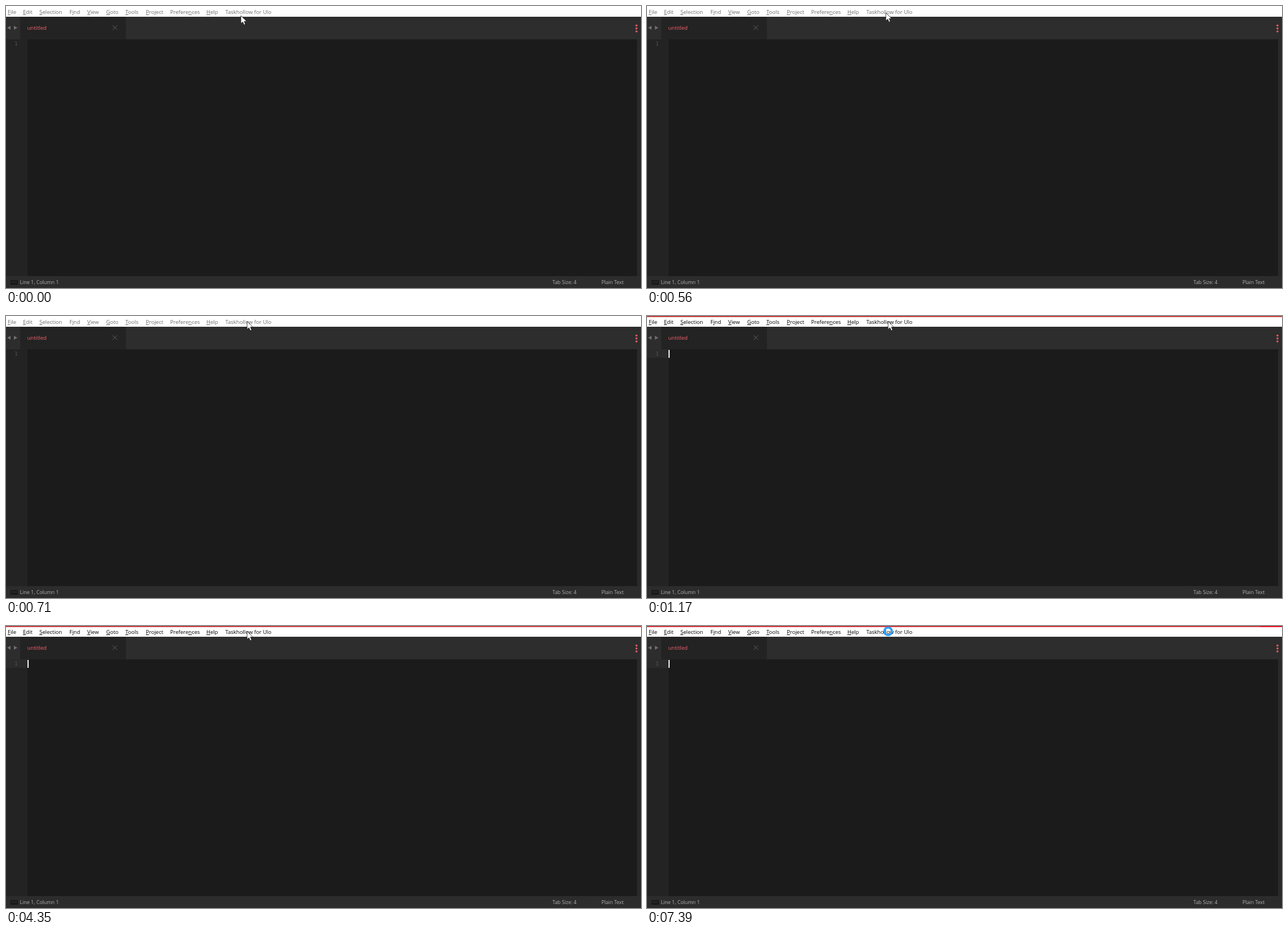
An HTML page with a canvas that plays this animation: 1122 by 499 pixels, repeating every 8000 ms.

```html
<!DOCTYPE html>
<html lang="en">
<head>
<meta charset="utf-8">
<title>Text editor</title>
<style>
  html, body { margin: 0; width: 100%; height: 100%; overflow: hidden; background: #1b1b1b; }
  canvas { display: block; }
</style>
</head>
<body>
<canvas id="stage" width="1122" height="499"></canvas>
<script>
const ctx = document.getElementById('stage').getContext('2d');
const W = 1122, H = 499, LOOP = 8000;
const UI = '"Open Sans", "Noto Sans", sans-serif';
const MONO = '"DejaVu Sans Mono", monospace';

// label, left edge, index of the underlined letter
const MENU = [
  ['File', 3, 0], ['Edit', 30, 0], ['Selection', 59, 0], ['Find', 112, 1],
  ['View', 143.5, 0], ['Goto', 177, 0], ['Tools', 211, 0], ['Project', 247, 0],
  ['Preferences', 290, 7], ['Help', 354, 0], ['Taskhollow for Ulo', 387.5, -1]
];

// start time and tip of the pointer
const POINTER = [[0, 415, 17], [560, 422, 12], [710, 426, 9.5]];
const FOCUS = 1020, UNHOVER = 1170, BUSY = 6470;

function rect(x, y, w, h, color) {
  ctx.fillStyle = color;
  ctx.fillRect(x, y, w, h);
}

function text(str, x, y, size, color, family = UI) {
  ctx.font = `${size}px ${family}`;
  ctx.fillStyle = color;
  ctx.fillText(str, x, y);
}

function shape(points, color) {
  ctx.beginPath();
  points.forEach(([x, y]) => ctx.lineTo(x, y));
  ctx.closePath();
  ctx.fillStyle = color;
  ctx.fill();
}

function menuBar(t) {
  const active = t >= FOCUS;
  const ink = active ? '#000' : '#6d6d6d';
  rect(0, 0, W, 19, '#fff');
  if (active) {
    rect(0, 0, W, 2, t < BUSY ? '#c94343' : '#d23a3f');
    if (t >= BUSY) rect(1084, 0, 38, 2, '#e81123');
  }
  if (active && t < UNHOVER) {
    rect(381, 2, 97, 16, '#a5d6fb');
    rect(382, 3, 95, 14, '#cce8ff');
  }
  for (const [label, x, key] of MENU) {
    text(label, x, 13.5, 9.5, ink);
    if (key < 0) continue;
    const left = x + ctx.measureText(label.slice(0, key)).width;
    rect(left, 15, ctx.measureText(label[key]).width, 1, ink);
  }
}

function tabBar() {
  rect(0, 19, W, 40, '#2d2d2d');
  rect(25, 19, 187, 40, '#232323');
  shape([[2, 38.5], [8, 35], [8, 42]], '#707070');
  shape([[20, 38.5], [14, 35], [14, 42]], '#707070');
  text('untitled', 37.5, 42, 9.5, '#f4606c');

  ctx.strokeStyle = '#606060';
  ctx.lineWidth = 1;
  ctx.beginPath();
  for (const s of [-1, 1]) {
    ctx.moveTo(192.3 - 4 * s, 34.3);
    ctx.lineTo(192.3 + 4 * s, 42.3);
  }
  ctx.stroke();

  ctx.fillStyle = '#ee5c68';
  for (const y of [34.6, 39.8, 45]) {
    ctx.beginPath();
    ctx.arc(1114, y, 1.8, 0, Math.PI * 2);
    ctx.fill();
  }
}

function editor(t) {
  rect(0, 59, W, 419, '#1b1b1b');
  rect(0, 59, 38, 419, '#232323');
  rect(1115, 59, 7, 419, '#292929');
  if (t >= FOCUS) {
    rect(0, 59, 37, 15, '#2b2b2b');
    rect(38, 60, 2, 14, '#f8f8f8');
  }
  text('1', 15, 70, 9.5, '#545454', MONO);
}

function statusBar() {
  rect(0, 478, W, 21, '#2c2c2c');
  rect(8, 485, 13, 8, '#141414');
  rect(9, 486, 11, 5, '#222');
  text('Line 1, Column 1', 24.5, 491.5, 8.9, '#b0b0b0');
  text('Tab Size: 4', 965.5, 491.5, 8.8, '#b0b0b0');
  text('Plain Text', 1052, 491.5, 8.9, '#b0b0b0');
}

function arrow(x, y) {
  const outline = [[0, 0], [0, 14.2], [3.3, 11.2], [5.6, 16.4], [8, 15.3], [5.8, 10.2], [10.3, 10.2]];
  ctx.save();
  ctx.translate(x, y);
  shape(outline, '#fff');
  ctx.strokeStyle = '#111';
  ctx.lineWidth = 0.8;
  ctx.lineJoin = 'round';
  ctx.stroke();
  ctx.restore();
}

function busyRing(x, y) {
  ctx.beginPath();
  ctx.arc(x, y, 6.7, 0, Math.PI * 2);
  ctx.strokeStyle = '#1687ea';
  ctx.lineWidth = 3.6;
  ctx.stroke();
  ctx.strokeStyle = '#35a5fa';
  ctx.lineWidth = 2;
  ctx.stroke();
}

function pointer(t) {
  if (t >= BUSY) return busyRing(426, 9.5);
  const [, x, y] = POINTER.filter(p => p[0] <= t).pop();
  arrow(x, y);
}

function draw(t) {
  ctx.clearRect(0, 0, W, H);
  menuBar(t);
  tabBar();
  editor(t);
  statusBar();
  pointer(t);
}

const start = performance.now();
function tick() {
  draw((performance.now() - start) % LOOP);
  requestAnimationFrame(tick);
}
tick();
</script>
</body>
</html>
```
